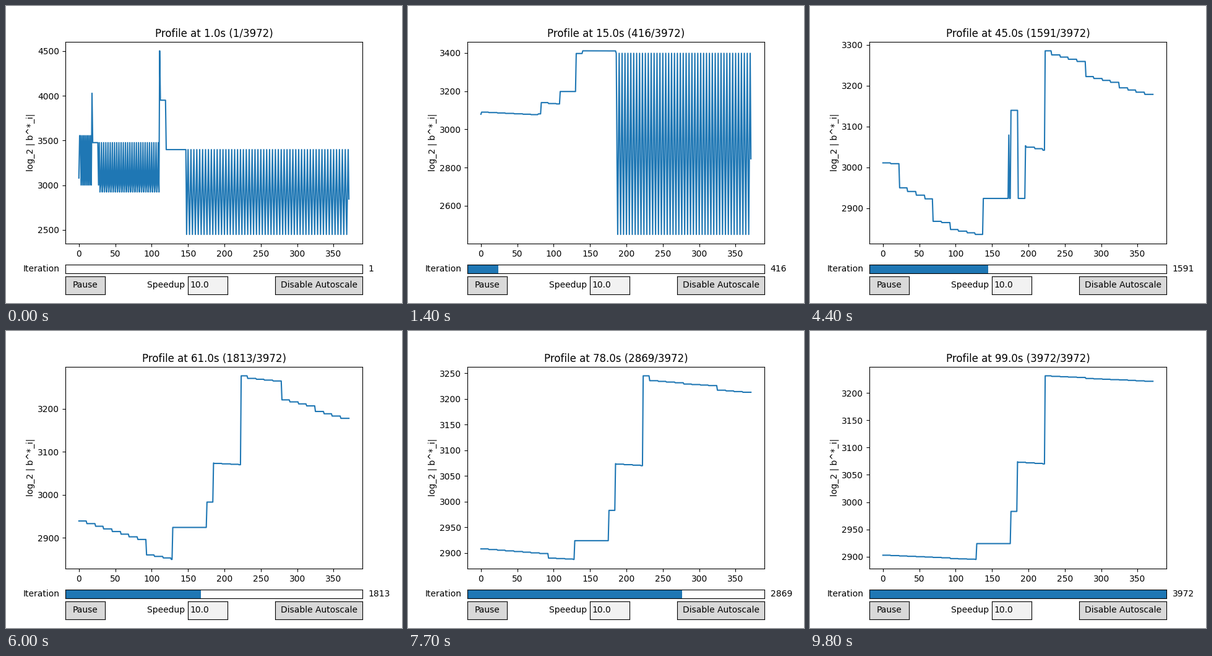
A matplotlib script for the animation above (9900 ms loop, 640 by 480 pixels).

```python
import numpy as np
import matplotlib.pyplot as plt
from matplotlib.animation import FuncAnimation

FRAMES = 99
TOTAL = 3972
SIZE = 372
FIRST, SWEPT, HOLD = 14, 28, 30  # seconds at which the early passes end

# the list is reduced in 32 blocks, which show as terraces
BLOCK = ((np.arange(SIZE) + 0.9) * 32 / SIZE).astype(int)
RIPPLE = np.random.default_rng(4).normal(0, 1.1, SIZE)


def raw_profile():
    """Each vector (a, b) starts at a height set by its shift and degree."""
    groups = [
        ([(0, 0)], 1), ([(1, 0)], 1),
        ([(1, 0), (1, 1)], 8),
        ([(2, 0)], 1), ([(2, 1)], 8),
        ([(1, 1), (2, 1), (2, 2)], 28),
        ([(3, 0)], 1), ([(3, 1)], 8), ([(3, 2)], 28),
        ([(1, 2), (2, 2), (3, 2), (3, 3)], 56),
    ]
    return np.array([3080 + 474 * a - 552 * b for block, n in groups
                     for _ in range(n) for a, b in block], float)


RAW = raw_profile()


def terraces(groups):
    """Each group (start, first, last) falls evenly from block to block."""
    y = np.empty(SIZE)
    starts = [int(round(g[0])) for g in groups] + [SIZE]
    for (_, *ends), a, b in zip(groups, starts, starts[1:]):
        if a < b:
            k = BLOCK[a:b] - BLOCK[a]
            y[a:b] = ends[0] + (ends[-1] - ends[0]) * k / max(1, k[-1])
    return y


def base(scale=1):
    return [(0, 3079), (scale, 3090, 3077), (79 * scale, 3081),
            (83 * scale, 3140)]


def first_pass(t):
    front = int(round(186 * (t / FIRST) ** 0.8))
    hump = np.interp(front, [18, 27, 111, 148, 186], [0, 9, 9, 46, 55])
    top = front - hump
    scale = top / 131
    groups = base(scale) + [(93 * scale, 3135, 3133), (109 * scale, 3198)]
    if front < 111:
        groups += [(top, 3476)]
    else:
        groups += [(top, 3397), (top + 9, 3411, 3408)]
    y = terraces(groups)
    y[front:] = RAW[front:]
    return y


def second_pass(g):
    def mix(a, b):
        return a + (b - a) * g

    tail = int(round(mix(186, 279)))
    front = int(round(mix(186, SIZE)))
    y = terraces(base() + [
        (93, 2450),
        (mix(93, 97), 2677, 2640),
        (mix(93, 150), 2924),
        (mix(93, 196), mix(3135, 3053), mix(3133, 3041)),
        (mix(109, 223), 3198),
        (mix(131, 223), 3397),
        (mix(140, 232), 3411, mix(3408, 3388)),
        (tail, 3120),
    ])
    y[tail:] += RIPPLE[tail:]
    y[front:] = RAW[front:]
    return y


def valley():
    return terraces([
        (0, 3011, 3009), (23, 2950, 2923), (69, 2868, 2865),
        (93, 2848, 2836), (138, 2924), (173, 3079), (174, 2924),
        (176, 3139.5), (186, 2924), (196, 3053, 3042), (223, 3285),
        (232, 3275, 3259), (279, 3222, 3208), (325, 3194.5, 3178.5)])


def settled(left, dip, peak, shoulder, tail, end):
    """Late shape: a fixed staircase between two slowly levelling wings."""
    return terraces([
        (0, *left), (93, *dip), (129, 2924), (176, 2983),
        (185, 3074, 3070), (223, peak), (232, *shoulder),
        (279, *tail), (325, *end)])


STAGES = [
    (HOLD, second_pass(1)),
    (44, valley()),
    (60, settled((2939, 2896), (2860, 2849.5), 3277,
                 (3271, 3265), (3221, 3207), (3194, 3178))),
    (77, settled((2908, 2899), (2890, 2887.5), 3245,
                 (3235.5, 3231.5), (3229, 3226), (3217, 3213))),
    (98, settled((2902.7, 2898), (2896.5, 2895), 3231.5,
                 (3230.5, 3228.5), (3226.6, 3224.5), (3224, 3221.5))),
]


def profile(t):
    if t <= FIRST:
        return first_pass(t)
    if t <= HOLD:
        return second_pass(min(1, (t - FIRST) / (SWEPT - FIRST)))
    for (t0, y0), (t1, y1) in zip(STAGES, STAGES[1:]):
        if t <= t1:
            return y0 + (y1 - y0) * (t - t0) / (t1 - t0)


def iteration(t):
    if t <= FIRST:
        return round(1 + 415 * (t / FIRST) ** 0.8)
    return int(round(np.interp(t, [14, 28, 44, 60, 77, 98],
                               [416, 751, 1591, 1813, 2869, TOTAL])))


def panel(rect, color="white"):
    box = fig.add_axes(rect, facecolor=color)
    box.set(xticks=[], yticks=[])
    return box


def label(box, x, text, align):
    return box.text(x, 0.5, text, transform=box.transAxes,
                    ha=align, va="center")


fig, ax = plt.subplots(figsize=(6.4, 4.8), dpi=100)
fig.subplots_adjust(left=0.15, right=0.9, bottom=0.2, top=0.88)
line, = ax.plot(np.arange(SIZE), RAW)
ax.set_ylabel("log_2 | b^*_i|", labelpad=3.28)
title = ax.set_title("", pad=5.28)

slider = panel([0.15, 0.1, 0.75, 0.03])
slider.set_xlim(1, TOTAL)
slider.set_ylim(0, 1)
bar = plt.Rectangle((1, 0), 0, 1, facecolor="C0", linewidth=0)
slider.add_patch(bar)
label(slider, -0.02, "Iteration", "right")
count = label(slider, 1.02, "1", "left")

label(panel([0.15, 0.03, 0.1, 0.06], "0.85"), 0.5, "Pause", "center")
entry = panel([0.46, 0.03, 0.1, 0.06], "0.95")
label(entry, -0.01, "Speedup ", "right")
label(entry, 0.05, "10.0", "left")
label(panel([0.68, 0.03, 0.22, 0.06], "0.85"), 0.5,
      "Disable Autoscale", "center")


def update(t):
    n = iteration(t)
    line.set_ydata(profile(t))
    ax.relim()
    ax.autoscale_view()
    title.set_text(f"Profile at {t + 1:.1f}s ({n}/{TOTAL})")
    bar.set_width(n - 1)
    count.set_text(str(n))
    return line, title, bar, count


anim = FuncAnimation(fig, update, frames=FRAMES, interval=100, repeat=True)
plt.show()
```
